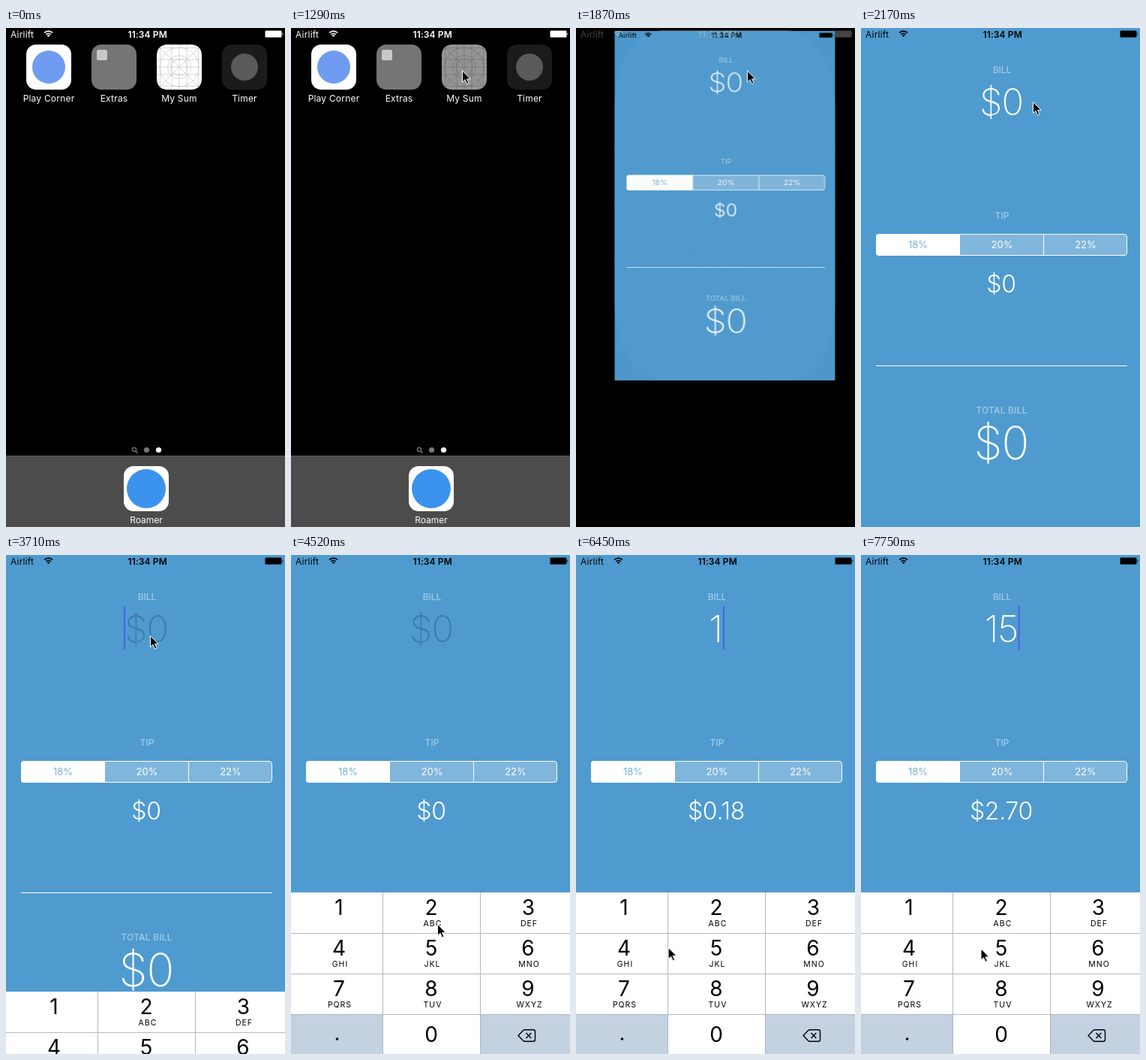
Animation, 372 px wide and 664 px high, one loop 8000 ms. Source, as an HTML page:

```html
<!DOCTYPE html>
<html lang="en">
<head>
<meta charset="utf-8">
<title>Tip calculator demo</title>
<style>
  html, body { margin: 0; width: 100%; height: 100%; overflow: hidden; background: #000; }
  svg { display: block; width: 100vw; height: 100vh; }
  text { font: 400 12px Inter, "Liberation Sans", sans-serif; text-anchor: middle; fill: currentColor; }
  .left { text-anchor: start; }
  .time { font-weight: 600; letter-spacing: .1px; }
  .white { color: #fff; }
  .black { color: #000; }

  /* App text */
  .label text { fill: #a3cbe8; font-weight: 500; }
  .bill text { font-size: 49px; font-weight: 200; letter-spacing: -1px; }
  .tip text { font-size: 32px; font-weight: 300; letter-spacing: -.3px; }
  .total { font-size: 61px; font-weight: 200; letter-spacing: -1px; }
  .segments text { font-size: 13px; }
  .digits text { font-size: 28px; }
  .letters text { font-size: 10.5px; letter-spacing: 1px; }

  /* One shared 8 s clock */
  .anim, .step { animation: 8s linear infinite; }
  .step { animation-timing-function: step-end; }

  .cursor { animation-name: cursor; }
  .press { animation-name: press; }
  .icons { animation-name: icons; }
  .names { animation-name: names; }
  .dock { animation-name: dock; }
  .app { animation-name: app; }
  .homebar { animation-name: homebar; }
  .keyboard { animation-name: keyboard; }
  .caret { animation-name: caret; }
  .idle { animation-name: idle; }
  .hint { animation-name: hint; }
  .empty { animation-name: empty; }
  .one { animation-name: one; }
  .two { animation-name: two; }
  .key1 { animation-name: key1; }
  .key5 { animation-name: key5; }

  @keyframes cursor {
    0%, 2.24% { opacity: 0; transform: translate(337px, 262px); }
    2.25% { opacity: 1; transform: translate(337px, 262px); animation-timing-function: ease-out; }
    9.375%, 23.75% { transform: translate(228px, 56.5px); }
    27.125%, 35.25% { transform: translate(229px, 98px); }
    38.25% { transform: translate(185px, 104px); }
    40.5%, 49.375% { transform: translate(192px, 107px); }
    55.125% { transform: translate(184px, 400px); }
    56.5%, 58.75% { transform: translate(195px, 491px); }
    60.25% { transform: translate(201px, 502px); }
    63.25%, 65.375% { transform: translate(157px, 526px); animation-timing-function: ease-in-out; }
    72.625%, 78.125% { transform: translate(76px, 473px); }
    80.625% { transform: translate(122.5px, 522px); animation-timing-function: ease-out; }
    85.625%, 100% { opacity: 1; transform: translate(159.5px, 523.5px); }
  }
  @keyframes press {
    0% { opacity: 0; }
    13.125% { opacity: .16; }
    14.625% { opacity: .3; }
    16.125%, 100% { opacity: .42; }
  }
  /* The pressed icon stretches together with the app window */
  @keyframes icons {
    0%, 21.24% { opacity: 1; transform: translate(0, 0) scale(1, 1); }
    21.25% { opacity: 1; transform: translate(-278px, -33px) scale(2.16, 2.32); }
    23.375% { opacity: 1; transform: translate(-929px, -166px) scale(4.88, 7.72); }
    25%, 100% { opacity: 0; transform: translate(-1130px, -220px) scale(5.8, 10); }
  }
  @keyframes names {
    0%, 21.24% { opacity: 1; }
    21.25% { opacity: .6; }
    22%, 100% { opacity: 0; }
  }
  @keyframes dock {
    0%, 21.24% { opacity: 1; transform: translateY(0); }
    21.25% { opacity: .7; transform: translateY(20px); }
    22.8%, 100% { opacity: 0; transform: translateY(110px); }
  }
  @keyframes app {
    0%, 21.24% { opacity: 0; transform: translate(201px, 22px) scale(.161, .09); }
    21.25% { opacity: .35; transform: translate(157px, 18px) scale(.346, .21); }
    23.375% {
      opacity: .98; transform: translate(52px, 4px) scale(.788, .697);
      animation-timing-function: cubic-bezier(.2, .5, .4, 1);
    }
    27.125%, 100% { opacity: 1; transform: translate(0, 0) scale(1, 1); }
  }
  @keyframes homebar {
    0%, 21.24% { opacity: 1; }
    21.25% { opacity: .85; }
    23.375% { opacity: .27; }
    25%, 100% { opacity: 0; }
  }
  @keyframes keyboard {
    0%, 45.6% { transform: translateY(215px); }
    45.625% { transform: translateY(192px); }
    46.375% { transform: translateY(133px); animation-timing-function: cubic-bezier(.2, .5, .4, 1); }
    50.375%, 100% { transform: translateY(0); }
  }
  @keyframes caret {
    0% { opacity: 0; transform: translateX(157px); }
    45.625% { opacity: 1; }
    52.875% { opacity: 0; }
    58.75% { opacity: 1; }
    65.375% { opacity: 0; }
    71.25% { opacity: 1; transform: translateX(157px); }
    77.875% { opacity: 1; transform: translateX(196px); }
    85% { opacity: 0; }
    91.25% { opacity: 1; }
    96.125%, 100% { opacity: 1; transform: translateX(209.5px); }
  }
  @keyframes idle { 0% { opacity: 1; } 45.625%, 100% { opacity: 0; } }
  @keyframes hint { 0% { opacity: 0; } 45.625% { opacity: 1; } 77.875%, 100% { opacity: 0; } }
  @keyframes empty { 0% { opacity: 1; } 77.875%, 100% { opacity: 0; } }
  @keyframes one { 0% { opacity: 0; } 77.875% { opacity: 1; } 96.125%, 100% { opacity: 0; } }
  @keyframes two { 0% { opacity: 0; } 96.125%, 100% { opacity: 1; } }
  @keyframes key1 { 0% { opacity: 0; } 75.625% { opacity: 1; } 77.875%, 100% { opacity: 0; } }
  @keyframes key5 { 0% { opacity: 0; } 94.625% { opacity: 1; } 96.8%, 100% { opacity: 0; } }
</style>
</head>
<body>
<svg viewBox="0 0 372 664">
  <defs>
    <g id="status">
      <text class="left" x="6" y="12.5" letter-spacing=".2">Airlift</text>
      <path d="M51.2 6.300a7.600 7.600 0 0 1 10.800 0M53.400 8.600a4.500 4.500 0 0 1 6.400 0" fill="none" stroke="currentColor" stroke-width="1.7"/>
      <path d="M56.600 12.100l-2-2.200a2.800 2.800 0 0 1 4 0z" fill="currentColor"/>
      <text class="time" x="188.700" y="12.500">11:34 PM</text>
      <rect x="345.500" y="3.500" width="22" height="9" rx="1.500" fill="none" stroke="currentColor" stroke-opacity=".5"/>
      <rect x="346" y="4" width="21" height="8" rx=".5" fill="currentColor"/>
      <path d="M368.500 6.300a2 2 0 0 1 0 3.400z" fill="currentColor"/>
    </g>
    <rect id="tile" width="60" height="60" rx="13"/>
    <clipPath id="tileClip"><use href="#tile"/></clipPath>
    <clipPath id="screenClip"><rect width="372" height="664"/></clipPath>
  </defs>

  <rect width="372" height="664"/>

  <!-- Home screen -->
  <g class="anim dock white">
    <g fill="none" stroke="#777" stroke-width="1.3">
      <circle cx="171" cy="561" r="2.6"/><path d="M173 563l2.6 2.8"/>
    </g>
    <circle cx="187.5" cy="561.5" r="3.6" fill="#777"/>
    <circle cx="203.5" cy="561.5" r="3.6" fill="#fff"/>
    <rect y="569" width="372" height="95" fill="#4c4c4c"/>
    <rect y="569" width="372" height="1" fill="#5c5c5c"/>
    <use href="#tile" x="157" y="583" fill="#fff"/>
    <circle cx="187" cy="613" r="26" fill="#3c93ee"/>
    <text x="187" y="659">Roamer</text>
  </g>
  <g class="anim icons white">
    <use href="#tile" x="27" y="22" fill="#fff"/>
    <circle cx="57" cy="52" r="22" fill="#6f9cf0"/>
    <use href="#tile" x="114" y="22" fill="#757575"/>
    <rect x="121" y="29" width="14" height="14" rx="2.5" fill="#c8c8c8"/>
    <g transform="translate(201 22)" clip-path="url(#tileClip)">
      <use href="#tile" fill="#fff"/>
      <g fill="none" stroke="#bcbcbc" stroke-width=".6">
        <path d="M0 0L60 60M60 0L0 60M4.5 0V60M20 0V60M30 0V60M40 0V60M55.5 0V60M0 4.5H60M0 20H60M0 30H60M0 40H60M0 55.5H60"/>
        <circle cx="30" cy="30" r="26"/><circle cx="30" cy="30" r="15.5"/><circle cx="30" cy="30" r="11"/>
      </g>
      <use class="step press" href="#tile" fill="#000"/>
    </g>
    <use href="#tile" x="288" y="22" fill="#1b1b1b"/>
    <circle cx="318" cy="52" r="18" fill="#5a5a5a"/>
    <g class="anim names" letter-spacing=".2">
      <text x="57" y="98">Play Corner</text>
      <text x="144" y="98">Extras</text>
      <text x="231" y="98">My Sum</text>
      <text x="318" y="98">Timer</text>
    </g>
  </g>

  <!-- Calculator -->
  <g class="anim app white">
    <g clip-path="url(#screenClip)">
      <rect width="372" height="664" fill="#4f9bcf"/>
      <use class="black" href="#status"/>
      <g class="label">
        <text x="188" y="59.5">BILL</text>
        <text x="188" y="253.5">TIP</text>
        <text x="187.5" y="512.5" letter-spacing=".2">TOTAL BILL</text>
      </g>

      <g class="bill">
        <text class="step idle" x="187" y="115.5">$0</text>
        <text class="step hint" x="187" y="115.5" style="fill:#3f7dac">$0</text>
        <text class="step one" x="186" y="115.5">1</text>
        <text class="step two" x="187" y="115.5">15</text>
      </g>
      <rect class="step caret" y="68" width="2" height="58" fill="#5061e6"/>

      <g class="segments">
        <rect x="20.5" y="274.5" width="334" height="28" rx="3.5" fill="#80b6dc" stroke="#fff"/>
        <path d="M132 274V303H24a4 4 0 0 1-4-4V278a4 4 0 0 1 4-4z" fill="#fff"/>
        <path d="M243.5 274V303" stroke="#fff"/>
        <text x="76" y="293" style="fill:#74b0da">18%</text>
        <text x="188" y="293">20%</text>
        <text x="299.5" y="293">22%</text>
      </g>

      <g class="tip">
        <text class="step empty" x="187" y="352">$0</text>
        <text class="step one" x="187" y="352">$0.18</text>
        <text class="step two" x="187" y="352">$2.70</text>
      </g>
      <rect x="20" y="449" width="335" height="1" fill="#fff"/>
      <text class="total" x="187" y="574">$0</text>

      <g class="anim keyboard black">
        <rect y="449" width="372" height="215" fill="#fff"/>
        <path d="M0 611H123V664H0zM252 611H372V664H252z" fill="#c3d1e1"/>
        <rect class="step key1" y="449" width="122" height="54" fill="#c3d1e1"/>
        <rect class="step key5" x="123" y="503" width="129" height="54" fill="#c3d1e1"/>
        <path d="M0 503.5H372M0 557.5H372M0 611.5H372M122.5 449V664M252.5 449V664" stroke="#b3b7bd"/>
        <g class="digits">
          <text x="64" y="479">1</text><text x="187" y="479">2</text><text x="316.5" y="479">3</text>
          <text x="64" y="533">4</text><text x="187" y="533">5</text><text x="316" y="533">6</text>
          <text x="64" y="587">7</text><text x="187" y="587">8</text><text x="316" y="587">9</text>
          <text x="187" y="648">0</text>
        </g>
        <circle cx="61.5" cy="644" r="1.8"/>
        <g class="letters">
          <text x="189" y="494">ABC</text><text x="317.5" y="494">DEF</text>
          <text x="65.5" y="548">GHI</text><text x="188.5" y="548">JKL</text><text x="317.5" y="548">MNO</text>
          <text x="65" y="602">PQRS</text><text x="189" y="602">TUV</text><text x="318" y="602">WXYZ</text>
        </g>
        <g fill="none" stroke="#000" stroke-width="1.4" stroke-linejoin="round">
          <path d="M303 639.5l6.5-6.8q1-1 2.4-1H323q2.5 0 2.5 2.5V644.8q0 2.5-2.5 2.5H311.9q-1.4 0-2.4-1z"/>
          <path d="M313.5 636l6.8 7M320.3 636l-6.8 7"/>
        </g>
      </g>
    </g>
  </g>

  <use class="anim homebar white" href="#status"/>

  <path class="anim cursor" d="M.5 .5V15.5L4 12.3 6.5 18 9 17 6.5 11.3H11.2z" stroke="#fff" stroke-linejoin="round"/>
</svg>
</body>
</html>
```
